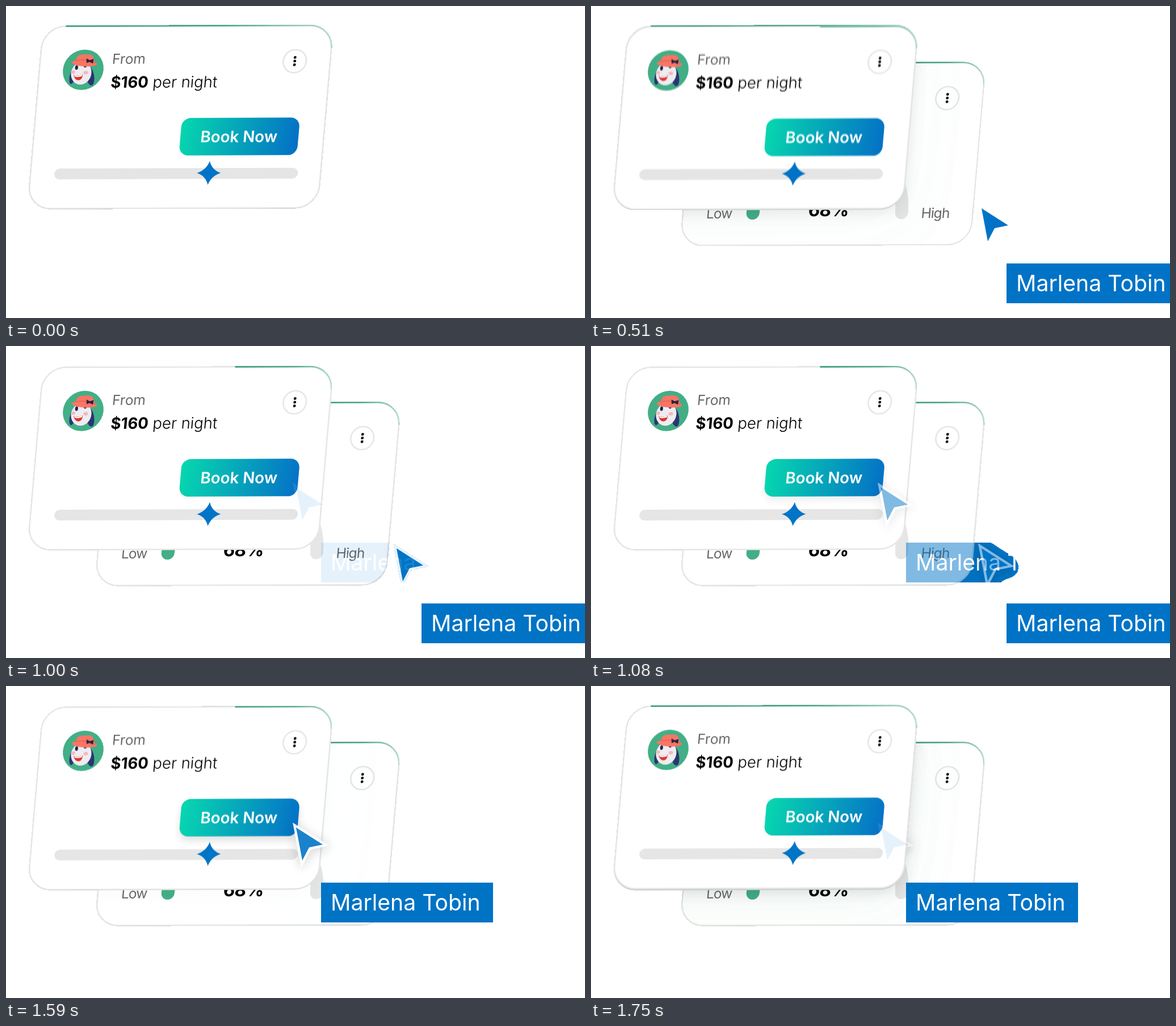
An HTML page with a canvas that plays this animation: 1020x549 px, repeating every 1.77 s.

```html
<!DOCTYPE html>
<html lang="en">
<head>
<meta charset="utf-8">
<title>Booking cards</title>
<style>
  html, body { margin: 0; width: 100%; height: 100%; overflow: hidden; background: #fff; }
  canvas { display: block; }
</style>
</head>
<body>
<canvas id="stage" width="1020" height="549"></canvas>
<script>
const W = 1020, H = 549;
const SEGMENT = 590, HOLD = 410, STEP = 20, STEPS = 10;
const BLUE = '#0073c6', GREEN = '#41ae85', GREY = '#e5e5e5';
const CARD_W = 511, CARD_H = 321, RADIUS = 40;

function layer() {
  const canvas = document.createElement('canvas');
  canvas.width = W;
  canvas.height = H;
  return canvas.getContext('2d', { willReadFrequently: true });
}

function box(c, x, y, w, h, r, fill) {
  c.beginPath();
  c.roundRect(x, y, w, h, r);
  c.fillStyle = fill;
  c.fill();
}

function oval(c, x, y, rx, ry, fill, turn = 0) {
  c.beginPath();
  c.ellipse(x, y, rx, ry, turn, 0, 7);
  c.fillStyle = fill;
  c.fill();
}

function shape(c, path, fill) {
  c.fillStyle = fill;
  c.fill(new Path2D(path));
}

function text(c, str, x, y, size, weight, fill, align = 'left', spacing = 0) {
  c.font = `${weight} ${size}px Inter, sans-serif`;
  c.letterSpacing = spacing + 'px';
  c.textAlign = align;
  c.fillStyle = fill;
  c.fillText(str, x, y);
  return c.measureText(str).width;
}

function shadow(c, color, blur, dy) {
  c.shadowColor = color;
  c.shadowBlur = blur;
  c.shadowOffsetY = dy;
}

// Slanted panel; its border turns green from greenStart to the right corner.
function card(c, x, y, greenStart, shadows, content) {
  c.save();
  c.setTransform(1, -.003, -.086, 1, x, y);
  for (const [color, blur, dy] of shadows) {
    shadow(c, color, blur, dy);
    box(c, 0, 0, CARD_W, CARD_H, RADIUS, '#fff');
  }
  shadow(c, 'transparent', 0, 0);
  box(c, 0, 0, CARD_W, CARD_H, RADIUS, '#fff');
  c.lineWidth = 2.5;
  c.strokeStyle = GREY;
  c.stroke();

  const fade = c.createLinearGradient(greenStart, 0, CARD_W, 0);
  fade.addColorStop(0, '#36997a');
  fade.addColorStop(.6, '#4ba687');
  fade.addColorStop(1, '#b9dccd');
  c.beginPath();
  c.moveTo(greenStart, 0);
  c.arcTo(CARD_W, 0, CARD_W, RADIUS, RADIUS);
  c.strokeStyle = fade;
  c.stroke();

  c.beginPath();
  c.arc(448.6, 62.6, 20.3, 0, 7);
  c.strokeStyle = GREY;
  c.stroke();
  for (const dy of [-6.5, 0, 6.5]) oval(c, 448.6, 62.6 + dy, 2.4, 2.4, '#0a0a0a');
  content(c);
  c.restore();
}

function avatar(c) {
  c.save();
  c.translate(77.1, 76.8);
  oval(c, 0, 0, 35.8, 35.6, GREEN);
  oval(c, 13, 11, 7, 17, '#2b3372', -.25);
  oval(c, -18, 12, 5, 13, '#2b3372', .1);
  oval(c, -3, 6, 18, 20, '#eeebf1');
  oval(c, -17, 4, 3, 3, '#f5b5b8');
  oval(c, 5, 5, 4, 3, '#f5b5b8');
  oval(c, -12, -4, 2.6, 4, '#1f2450');
  oval(c, 3, -6, 2.4, 2, '#1f2450');
  shape(c, 'M-16 9Q-8 12 0 8Q0 18-7 18.5Q-14 18-16 9Z', '#d9362f');
  shape(c, 'M-15 9.5Q-8 12-1 8.5L-1 11Q-8 14-14 12Z', '#fff');
  shape(c, 'M-17-11L-12-24Q-9-27 0-27Q12-28 15-24L21-10Z', '#f87463');
  oval(c, 1, -11.5, 22.5, 5.5, '#f87463', .07);
  c.strokeStyle = '#d9584d';
  c.lineWidth = 1;
  c.stroke(new Path2D('M-15-16Q2-20 20-12'));
  shape(c, 'M4-20L10-17L17-19L16-11L10-14L5-12Z', '#2a2140');
  c.restore();
}

function booking(c, hover) {
  avatar(c);
  text(c, 'From', 126.8, 66.4, 24.5, 400, '#666');
  const price = text(c, '$160', 127.6, 108.4, 27.5, 700, '#000');
  text(c, ' per night', 127.6 + price, 108.4, 27.5, 300, '#000');

  box(c, 42, 250.5, 429, 19, 9.5, GREY);
  shape(c, 'M314 238Q319 254 335 259Q319 264 314 280Q309 264 293 259Q309 254 314 238Z', BLUE);

  const sweep = c.createLinearGradient(258, 180, 467, 210);
  sweep.addColorStop(0, '#06d6ae');
  sweep.addColorStop(1, '#0470c6');
  if (hover) shadow(c, 'rgba(0,0,0,.14)', 14, 7);
  box(c, 258.5, 162, 208, 66, 16, sweep);
  shadow(c, 'transparent', 0, 0);
  text(c, 'Book Now', 361.6, 205, 27.7, 600, '#fff', 'center');
}

function gauge(c) {
  c.lineWidth = 23;
  c.lineCap = 'round';
  for (const [end, color] of [[0, GREY], [-1, GREEN]]) {
    c.beginPath();
    c.arc(254.5, 264, 131, Math.PI, end);
    c.strokeStyle = color;
    c.stroke();
  }
  text(c, 'Low', 41.4, 273.1, 24.5, 400, '#666', 'left', -1);
  text(c, '68%', 256.3, 270, 31.5, 700, '#000', 'center', -.6);
  text(c, 'High', 420, 273.6, 24.5, 400, '#666', 'left', -1);
}

function pointer(c, x, y) {
  const arrow = new Path2D('M5 9L52 39L28 44L16 67Z');
  c.save();
  c.translate(x, y);
  box(c, 49, 106, 303, 70, 0, BLUE);
  text(c, 'Marlena Tobin', 66, 155, 39.2, 400, '#fff');
  shadow(c, 'rgba(0,0,0,.25)', 19, 3);
  c.lineWidth = 8.4;
  c.strokeStyle = '#fff';
  c.stroke(arrow);
  shadow(c, 'transparent', 0, 0);
  c.fillStyle = BLUE;
  c.fill(arrow);
  c.restore();
}

function idleScene() {
  const c = layer();
  const shadows = [['rgba(50,150,110,.07)', 110, 24], ['rgba(0,0,0,.14)', 26, 8]];
  card(c, 65.5, 35.7, RADIUS, shadows, booking);
  return c.canvas;
}

function pointerScene(x, y, hover) {
  const c = layer();
  card(c, 184.5, 100.7, 338, [['rgba(0,0,0,.08)', 40, 6]], gauge);
  card(c, 65.5, 37.7, 338, [], c => booking(c, hover));
  pointer(c, x, y);
  return c.canvas;
}

const scenes = [idleScene(), pointerScene(683, 347, false), pointerScene(506, 240, true)];
const mixer = layer();

// Blend two scenes, then paint only pixels over half opaque onto the previous picture.
function dissolve(from, to, amount, previous) {
  mixer.globalCompositeOperation = 'lighter';
  mixer.clearRect(0, 0, W, H);
  mixer.globalAlpha = 1 - amount;
  mixer.drawImage(from, 0, 0);
  mixer.globalAlpha = amount;
  mixer.drawImage(to, 0, 0);
  const picture = mixer.getImageData(0, 0, W, H);
  const pixels = new Uint32Array(picture.data.buffer);
  const under = previous && new Uint32Array(previous.data.buffer);
  for (let i = 0; i < pixels.length; i++) {
    if (pixels[i] >>> 24 > 129) pixels[i] |= 0xff000000;
    else pixels[i] = under ? under[i] : 0xffffffff;
  }
  return picture;
}

const pictures = [];
scenes.forEach((scene, i) => {
  const next = scenes[(i + 1) % scenes.length];
  for (let k = 0; k < STEPS; k++) {
    pictures.push(dissolve(scene, next, k / STEPS, k ? pictures.at(-1) : null));
  }
});

const stage = document.getElementById('stage').getContext('2d');
const start = performance.now();
let shown = -1;

function draw() {
  const t = (performance.now() - start) % (SEGMENT * scenes.length);
  const step = Math.max(0, Math.floor((t % SEGMENT - HOLD) / STEP) + 1);
  const index = Math.floor(t / SEGMENT) * STEPS + step;
  if (index !== shown) stage.putImageData(pictures[index], 0, 0);
  shown = index;
  requestAnimationFrame(draw);
}
draw();
</script>
</body>
</html>
```
